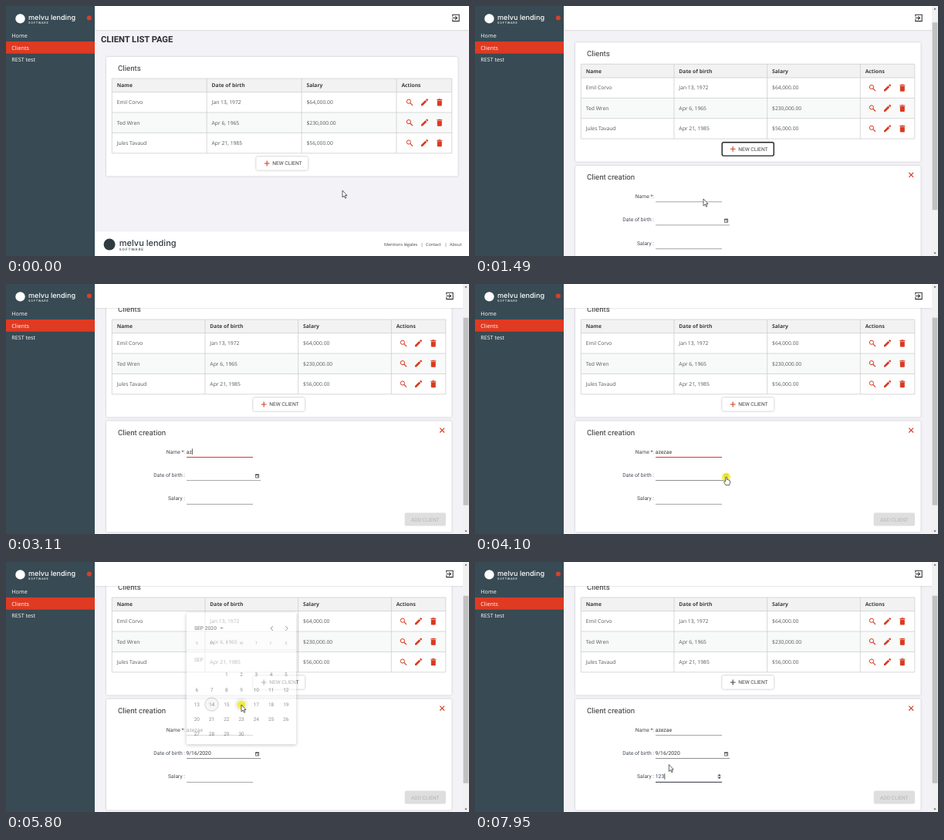
An HTML page for the animation above (8000 ms loop, 600 by 324 pixels).

```html
<!DOCTYPE html>
<html lang="en">
<head>
<meta charset="utf-8">
<title>Client list page</title>
<style>
html, body { margin: 0; width: 100%; height: 100%; overflow: hidden; background: #f3f2f7; }
svg { display: block; width: 600px; height: 324px; text-rendering: geometricPrecision; }
text { white-space: pre; }
.open { font-family: "Open Sans", "Noto Sans", sans-serif; }
.rob { font-family: Roboto, "Open Sans", sans-serif; }
.logo { font-family: Inter, Lato, sans-serif; font-weight: 500; }
.card { fill: #fff; filter: drop-shadow(0 .5px 1px rgba(0,0,0,.22)); }
.btn { fill: #fff; filter: drop-shadow(0 .7px .9px rgba(0,0,0,.35)); }
.popup { fill: #fff; filter: drop-shadow(0 1px 2px rgba(0,0,0,.4)); }
</style>
</head>
<body>
<svg id="stage" viewBox="0 0 600 324" xmlns="http://www.w3.org/2000/svg"></svg>
<script>
const RED = '#d93a20', INK = '#55585c', LINE = '#cfcfcf';
const LOOP = 8000, SCROLL = 48;
const CLICKS = [740, 2210, 4050, 5690, 6400];
const FORM_AT = 860, NAME_AT = 2210, NAME_BLUR = 4250, OPEN_AT = 4540, CLOSE_AT = 5760, SALARY_AT = 6400;
const CAL_X = 247.3, CAL_Y = 146, CELL = 19.25;

const rect = (x, y, w, h, fill, extra = '') =>
  `<rect x="${x}" y="${y}" width="${w}" height="${h}" fill="${fill}" ${extra}/>`;
const box = (x, y, w, h, cls, r = 2) =>
  `<rect x="${x}" y="${y}" width="${w}" height="${h}" rx="${r}" class="${cls}"/>`;
const circle = (x, y, r, fill, extra = '') =>
  `<circle cx="${x}" cy="${y}" r="${r}" fill="${fill}" ${extra}/>`;
const path = (d, color, w = 1, extra = '') =>
  `<path d="${d}" fill="none" stroke="${color}" stroke-width="${w}" ${extra}/>`;
const shape = (d, fill, extra = '') => `<path d="${d}" fill="${fill}" ${extra}/>`;
// y is the middle of the capital letters
const label = (x, y, s, size, fill, cls = 'rob', extra = '') =>
  `<text x="${x}" y="${y + size * .357}" font-size="${size}" fill="${fill}" class="${cls}" ${extra}>${s}</text>`;
const at = (x, y, s, id = '') => `<g ${id && `id="${id}"`} transform="translate(${x} ${y})">${s}</g>`;
const BOLD = 'font-weight="700"', MEDIUM = 'font-weight="500"';
const END = 'text-anchor="end"', MID = 'text-anchor="middle"';

const search = circle(-1.1, -1.1, 2.6, 'none', `stroke="${RED}"`) + path('M.8 .8L4 4', RED, 1.2);
const pencil = shape('M-4.4 4.4V2.5L1-2.9 2.9-1 -2.5 4.4ZM1.6-3.5L2.7-4.5Q3.2-4.8 3.7-4.4L4.5-3.6Q4.8-3.1 4.5-2.6L3.5-1.6Z', RED);
const trash = shape('M-3-2.4H3V3.6Q3 4.6 2 4.6H-2Q-3 4.6-3 3.6ZM-3.6-3.9H-1.7L-1.2-4.5H1.2L1.7-3.9H3.6V-2.9H-3.6Z', RED);
const exit = path('M-4.2-1.6V-4.2H4.2V4.2H-4.2V1.6M-4.5 0H1.4M-.9-2.4L1.5 0L-.9 2.4', '#333', 1.05);
const dateIcon = color => path('M-2.1-1.9H2.1V2.3H-2.1Z', color, .8) + rect(-2.4, -2.2, 4.8, 1.5, color) + rect(0, .3, 1.3, 1.2, color);

function brand(x, y, k, color) {
  return at(x, y, circle(7.5 * k, 0, 6.2 * k, color) +
    label(18 * k, -1.2 * k, 'melvu lending', 9.1 * k, color, 'logo') +
    label(18 * k, 4.9 * k, 'SOFTWARE', 3.7 * k, color, 'logo', `letter-spacing="${.75 * k}"`));
}

const CLIENTS = [
  ['Emil Corvo', 'Jan 13, 1972', '$64,000.00'],
  ['Ted Wren', 'Apr 6, 1965', '$230,000.00'],
  ['Jules Tavaud', 'Apr 21, 1985', '$56,000.00']
];

// client card for a given page width
function listing(w) {
  const right = w - 22.2, cw = (right - 137.3) * .279, top = 94, rowH = 26.4, head = 17.6;
  const cols = [0, 1, 2, 3].map(i => 137.3 + i * cw), mid = (130 + w - 14.5) / 2;
  let s = label(123, 43.3, 'CLIENT LIST PAGE', 11.2, '#2b2c34', 'rob', BOLD);
  s += box(130, 66, w - 144.4, 154.5, 'card') + label(145, 80.6, 'Clients', 9.7, '#333');
  s += rect(137.3, top, right - 137.3, head, '#f2f2f2') +
       rect(137.3, top + head + rowH, right - 137.3, rowH, '#f8f9f9');
  ['Name', 'Date of birth', 'Salary', 'Actions'].forEach((h, i) =>
    s += label(cols[i] + 6.4, 103, h, 6.75, '#3c3e42', 'open', BOLD));
  CLIENTS.forEach((row, r) => {
    const y = top + head + rowH * (r + .5);
    row.forEach((v, i) => s += label(cols[i] + 6.4, y, v, 6.75, INK, 'open'));
    [search, pencil, trash].forEach((icon, i) => s += at(w - 77 + i * 19.4, y, icon));
    s += path(`M137.3 ${y - rowH / 2}H${right}`, LINE, .8);
  });
  s += path(cols.map(x => `M${x} ${top}v96.8`).join('') + `M137.3 ${top}H${right}v96.8H137.3`, LINE, .8);
  s += box(mid - 33.5, 195.2, 67, 17.6, 'btn');
  s += path(`M${mid - 23} 204h6.8M${mid - 19.6} 200.6v6.8`, RED, 1.1, 'class="plus"');
  return s + label(mid - 12.6, 203.9, 'NEW CLIENT', 6.7, '#444');
}

const under = (y, w, id) => path(`M234 ${y}h${w}`, '#8d8d8d', .8, `id="${id}"`);
const field = (y, s) => label(232, y, s, 6.77, '#434a56', 'rob', END);

function form() {
  return `<rect id="ring" x="320.2" y="195.4" width="67" height="17.4" rx="2" fill="none" stroke="#26262b" stroke-width="1.4"/>` +
    box(130, 225.6, 447.6, 144, 'card') +
    label(145, 240.4, 'Client creation', 9.7, '#333') +
    path('M562.3 234.7l5.8 5.8m0-5.8l-5.8 5.8', RED, 1.1) +
    field(265.2, 'Name *:') + field(295.4, 'Date of birth :') + field(326, 'Salary :') +
    under(272.5, 86, 'nameLine') + under(302.6, 96, 'dateLine') + under(333.4, 86, 'salaryLine') +
    path('', RED, 1.2, 'id="focusLine"') +
    at(325.5, 296.8, dateIcon('#555'), 'dateIcon') +
    label(233.8, 265.2, '', 6.77, '#333', 'rob', 'id="name"') +
    label(233.5, 295.4, '', 6.77, '#333', 'rob', 'id="date"') +
    label(233.8, 326, '', 6.77, '#33415c', 'rob', 'id="salary"') +
    path('', '#222', .7, 'id="caret"') +
    at(316.6, 326, rect(-2.8, -3.6, 5.6, 7.2, '#eee') + shape('M-2-.7L0-2.9 2-.7ZM-2 .7L0 2.9 2 .7Z', '#444'), 'spin') +
    rect(516.7, 344.6, 53.3, 17, '#dedede', 'rx="2"') +
    label(543.3, 353.2, 'ADD CLIENT', 6.6, '#b4b4b4', 'rob', MID) +
    `<g id="hint">${box(233.8, 331.3, 92.6, 24.6, 'popup', 1)}${label(239.4, 343.6, 'azerty', 6.5, '#222')}</g>`;
}

function calendar() {
  let s = box(233.8, 65.6, 142.4, 170.6, 'popup') +
    label(244, 85.4, 'SEP 2020', 6.7, '#444', 'rob', MEDIUM) + shape('M277.2 84.7h4.6l-2.3 2.4Z', '#666') +
    path('M346 83l-3 3 3 3M362.2 83l3 3-3 3', '#555', 1) +
    path('M234 113.6H376', '#e4e4e4', .7) + label(244, 126.4, 'SEP', 6.5, '#8b8b8b');
  [...'SMTWTFS'].forEach((d, i) => s += label(CAL_X + i * CELL, 105, d, 5.4, '#999', 'rob', MID));
  s += circle(0, 0, 9, '#ececec', 'id="hover"') +
    circle(CAL_X + CELL, CAL_Y + 2 * CELL, 8.7, '#f0f0f0', 'stroke="#a3a3a3" stroke-width=".8"');
  for (let d = 1; d <= 30; d++) {
    const n = d + 1;
    s += label(CAL_X + n % 7 * CELL, CAL_Y + Math.floor(n / 7) * CELL, d, 6.5, '#444', 'rob', MID);
  }
  return s;
}

const outlined = 'stroke="#222" stroke-width=".7" stroke-linejoin="round"';
const cursors =
  `<g id="arrow">${shape('M0 0V8.9L2.1 7 3.5 10.2 4.9 9.6 3.5 6.5H6Z', '#fff', outlined)}</g>` +
  `<g id="hand">${shape('M-.9 6V.6Q0-.5.9.6V3.6Q1.9 3 2.4 3.9 3.4 3.5 3.8 4.4 4.9 4.2 5 5.3V7.6L4.2 10.6H-.6L-2.8 6.9Q-2.9 5.3-1.7 5.6Z', '#fff', outlined)}</g>` +
  `<g id="beam">${path('M-1.6-4Q0-4 0-3.2Q0-4 1.6-4M0-3.4V3.4M-1.6 4Q0 4 0 3.2Q0 4 1.6 4', '#222', .8)}</g>`;

const stage = document.getElementById('stage');
stage.innerHTML = rect(0, 0, 600, 324, '#f3f2f7') +
  `<g id="before">${listing(600)}${rect(115, 292.5, 485, 32, '#fff')}` +
  brand(125, 309, 1.21, '#2f3b42') +
  label(490, 309, 'Mentions légales', 5.5, '#444', 'open') + label(537.6, 309, '|', 5.5, '#444', 'open') +
  label(544, 309, 'Contact', 5.5, '#444', 'open') + label(568.4, 309, '|', 5.5, '#444', 'open') +
  label(575, 309, 'About', 5.5, '#444', 'open') + '</g>' +
  `<g id="after">${listing(592)}${form()}</g>` +
  box(115, 0, 485, 31, 'card', 0) + at(583, 15.4, exit, 'exit') +
  rect(0, 0, 115, 324, '#384a53') + rect(0, 46, 115, 15.7, '#df3a22') +
  brand(11, 16.4, 1, '#fff') + circle(107.8, 15.4, 3, '#d8402b') +
  ['Home', 'Clients', 'REST test'].map((s, i) => label(7.3, 38.9 + i * 15.3, s, 7.2, '#fff', 'open')).join('') +
  `<g id="bar">${rect(592, 0, 8, 324, '#f1f1f1')}${shape('M594.4 4.6h3.2l-1.6-2ZM594.4 319.4h3.2l-1.6 2Z', '#555')}` +
  rect(592.6, 7, 6.8, 243, '#c1c1c1', 'id="thumb"') + '</g>' +
  `<g id="cal">${calendar()}</g>` +
  circle(0, 0, 5.6, '#f4ec2c', 'id="halo" opacity=".85"') + cursors;

const ui = {};
stage.querySelectorAll('[id]').forEach(el => ui[el.id] = el);
const plus = ui.after.querySelector('.plus');
const set = (el, name, v) => el.setAttribute(name, v);
const show = (el, on) => set(el, 'display', on ? 'inline' : 'none');
const clamp = v => Math.max(0, Math.min(1, v));
const ease = v => (1 - Math.cos(Math.PI * clamp(v))) / 2;
const within = (t, a, b) => t >= a && t < b;

// time, x, y of the pointer tip
const TRACK = [
  [30, 436, 239], [410, 363, 208], [540, 363, 208], [560, 363, 207], [920, 363, 207],
  [1490, 296, 250], [1940, 251, 222], [2040, 251, 219], [3590, 251, 219], [3600, 256, 243],
  [3680, 256, 243], [4030, 325.5, 250], [4580, 325.5, 250], [5120, 305, 216], [5370, 305, 216],
  [5640, 305, 185], [5860, 305, 185], [6150, 284, 244], [6360, 249.3, 278], [6880, 249.3, 278],
  [7060, 252.5, 277], [7290, 252.5, 277], [7300, 251.3, 262.5]
];

function pointer(t) {
  const i = TRACK.findIndex(k => k[0] > t);
  if (i === 0) return TRACK[0].slice(1);
  if (i < 0) return TRACK[TRACK.length - 1].slice(1);
  const [t0, x0, y0] = TRACK[i - 1], [t1, x1, y1] = TRACK[i], k = ease((t - t0) / (t1 - t0));
  return [x0 + (x1 - x0) * k, y0 + (y1 - y0) * k];
}

function pointerKind(t, x, y) {
  if (within(t, 2880, 3600) || within(t, 7290, 7800)) return 'none';
  if (within(t, 2000, 3600) || within(t, 6290, 7800)) return 'beam';
  if (t < 1000 && y < 213 && x > 324) return 'hand';
  if (within(t, 3900, 4700) && x > 320) return 'hand';
  if (within(t, 4700, CLOSE_AT + 40) && y < 236) return 'hand';
  return 'arrow';
}

const typed = (s, t, start, step) => s.slice(0, Math.max(0, Math.floor((t - start) / step) + 1));

function drawCaret(t) {
  let on = false, el = ui.name, y = 265.2;
  if (within(t, NAME_AT, NAME_BLUR)) {
    on = t < 2740 || within(t, 2880, 3640);
  } else if (t >= SALARY_AT) {
    el = ui.salary;
    y = 326;
    on = t < 6930 || within(t, 7290, 7480) || t >= 7950;
  }
  show(ui.caret, on);
  if (on) {
    const w = el.textContent ? el.getComputedTextLength() + .4 : 0;
    set(ui.caret, 'd', `M${234 + w} ${y - 3.8}v7.6`);
  }
}

function drawCalendar(t, x, y) {
  const open = within(t, OPEN_AT, CLOSE_AT + 100);
  show(ui.cal, open);
  if (!open) return;
  const grow = clamp((t - OPEN_AT) / 120), k = .8 + .2 * ease(grow);
  set(ui.cal, 'opacity', Math.min(grow, 1 - clamp((t - CLOSE_AT) / 100)));
  set(ui.cal, 'transform', `translate(0 ${236 * (1 - k)}) scale(1 ${k})`);
  const col = Math.round((x - CAL_X) / CELL), row = Math.round((y - CAL_Y) / CELL), day = row * 7 + col - 1;
  show(ui.hover, y < 233 && col >= 0 && col < 7 && day >= 1 && day <= 30);
  set(ui.hover, 'cx', CAL_X + col * CELL);
  set(ui.hover, 'cy', CAL_Y + row * CELL);
}

function draw(t) {
  const opened = t >= FORM_AT, scroll = opened ? SCROLL * ease((t - 1388) / 240) : 0;
  show(ui.before, !opened);
  show(ui.after, opened);
  show(ui.bar, opened);
  set(ui.exit, 'transform', `translate(${opened ? 575 : 583} 15.4)`);
  set(ui.after, 'transform', `translate(0 ${-scroll})`);
  set(ui.thumb, 'y', 7 + scroll * .765);
  show(ui.ring, t < NAME_AT);
  set(plus, 'stroke', t < CLOSE_AT ? RED : '#444');

  ui.name.textContent = typed('azezae', t, 2880, 125);
  ui.date.textContent = t >= CLOSE_AT ? '9/16/2020' : '';
  ui.salary.textContent = typed('123', t, 7290, 90);
  const half = 43 * ease((t - NAME_AT) / 300);
  show(ui.focusLine, within(t, NAME_AT, NAME_BLUR));
  set(ui.focusLine, 'd', `M${277 - half} 272.5h${half * 2}`);
  set(ui.dateLine, 'stroke', t > 4000 ? '#6a6a70' : '#8d8d8d');
  set(ui.salaryLine, 'stroke', t >= SALARY_AT ? '#55585f' : '#8d8d8d');
  set(ui.salaryLine, 'stroke-width', t >= SALARY_AT ? 1.1 : .8);
  const tint = within(t, OPEN_AT, CLOSE_AT) ? RED : '#555';
  for (const el of ui.dateIcon.children)
    set(el, el.tagName === 'path' ? 'stroke' : 'fill', tint);
  show(ui.spin, t >= 6300);
  show(ui.hint, within(t, 6430, 7290));
  drawCaret(t);

  const [x, y] = pointer(t), kind = pointerKind(t, x, y);
  drawCalendar(t, x, y);
  for (const name of ['arrow', 'hand', 'beam']) {
    show(ui[name], name === kind);
    set(ui[name], 'transform', `translate(${x} ${y})`);
  }
  show(ui.halo, CLICKS.some(c => within(t, c, c + 200)));
  set(ui.halo, 'cx', x);
  set(ui.halo, 'cy', y);
}

const begin = performance.now();
function tick() {
  draw((performance.now() - begin) % LOOP);
  requestAnimationFrame(tick);
}
tick();
</script>
</body>
</html>
```
